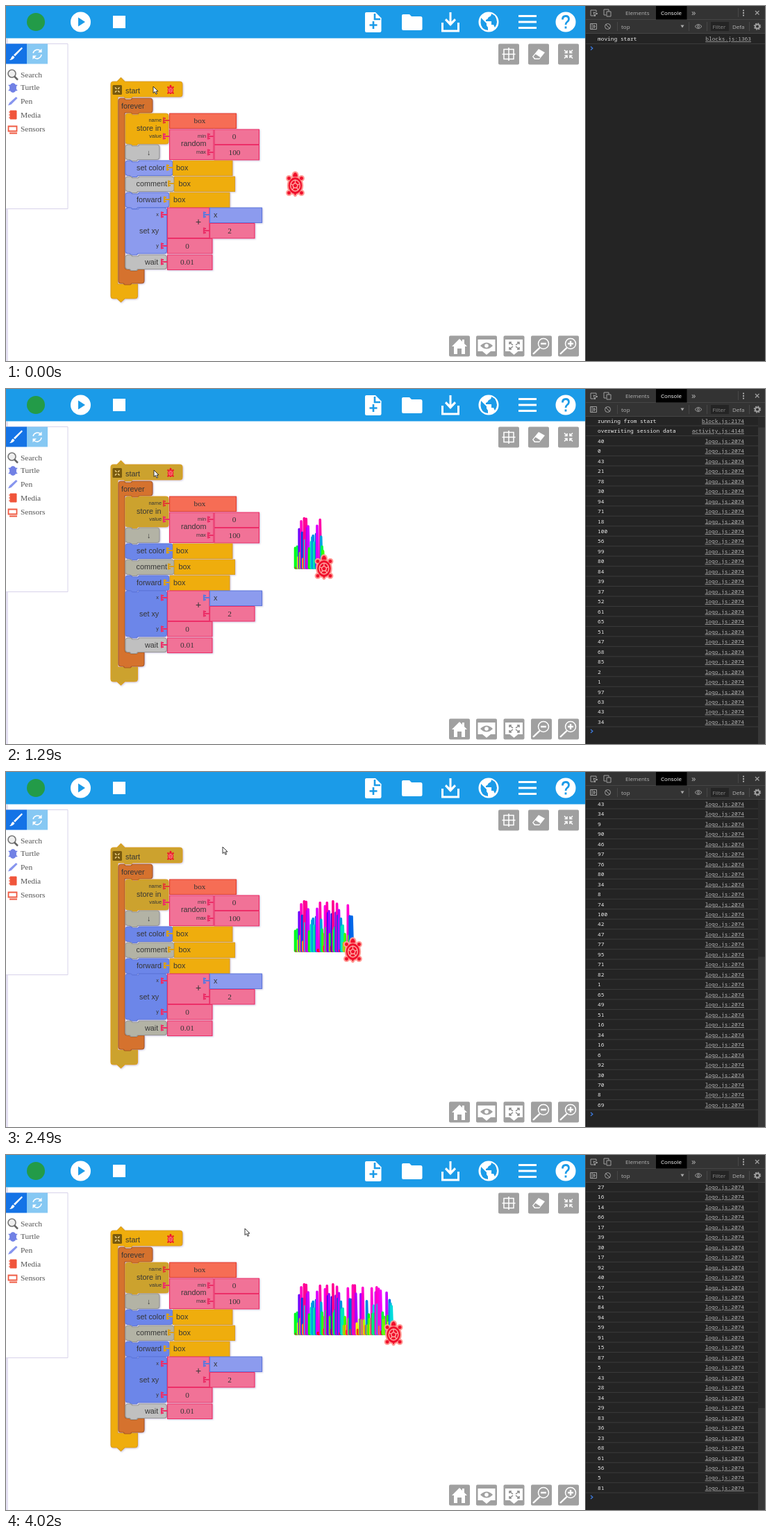
An HTML page that plays this animation: 1093 px wide and 512 px high, repeating every 4050 ms.

```html
<!DOCTYPE html>
<html lang="en">
<head>
<meta charset="utf-8">
<title>Block program</title>
<style>
html, body { margin: 0; width: 100%; height: 100%; overflow: hidden; background: #fff; }
svg { display: block; width: 100vw; height: 100vh; }
.sans { font: 10.8px "Liberation Sans", Arial, sans-serif; fill: #363636; }
.serif { font: 11.3px "Liberation Serif", Times, serif; fill: #333; }
.menu { font: 11.4px "Liberation Serif", Times, serif; fill: #555; }
.small { font-size: 7.4px; }
.mono { font: 7.84px "Noto Sans Mono", "DejaVu Sans Mono", monospace; fill: #eee; white-space: pre; }
.ui { font: 8px "Open Sans", "Noto Sans", sans-serif; fill: #b4b4b4; }
.link { fill: #b5b5b5; text-decoration: underline; text-anchor: end; }
.end { text-anchor: end; }
.mid { text-anchor: middle; }
.white { fill: #fff; }
.line { fill: none; stroke: #fff; stroke-width: 2; }
.thick { stroke-width: 3; }
.tool { fill: none; stroke: #a0a0a0; stroke-width: 1; }
.block { stroke-width: 1.2; stroke-linejoin: round; }
</style>
</head>
<body>
<svg viewBox="0 0 1093 512" preserveAspectRatio="none">
<defs>
  <filter id="shade" x="-10%" y="-10%" width="120%" height="120%">
    <feDropShadow dx="1" dy="1" stdDeviation="1.300" flood-color="#8a80b8" flood-opacity=".42"/>
  </filter>
  <clipPath id="log"><path d="M834 40H1093V512H834Z"/></clipPath>
  <g id="limbs">
    <path d="M-3-12Q-3-17 0-17.500 3-17 3-12ZM-1.500 12L0 15 1.500 12Z"/>
    <circle cx="-9" cy="-9.500" r="2.200"/><circle cx="9" cy="-9.500" r="2.200"/>
    <circle cx="-9" cy="11.500" r="2.200"/><circle cx="9" cy="11.500" r="2.200"/>
    <ellipse cy="1" rx="9.500" ry="11.500"/>
  </g>
  <g id="shell">
    <ellipse cy="1" rx="6.800" ry="8"/>
    <path d="M0-2.800L3.600 0 2.300 4.200H-2.300L-3.600 0ZM0-2.800V-7M3.600 0L6.500-1.500M2.300 4.200L4.200 7.300M-2.300 4.200L-4.200 7.300M-3.600 0L-6.500-1.500"/>
  </g>
  <g id="turtle">
    <use href="#limbs" fill="#ff9c96" stroke="#ff9c96" stroke-width="4.500" stroke-linejoin="round"/>
    <use href="#limbs" fill="#f0102c" stroke="#f0102c" stroke-width=".6"/>
    <use href="#shell" fill="none" stroke="#ffa8a2" stroke-width="1.400"/>
  </g>
</defs>

<rect width="834" height="512" fill="#fff"/>
<path d="M0 47H3V512H0Z" fill="#e4e0f2"/>
<rect width="834" height="46.500" fill="#1b9be8"/>

<circle cx="43" cy="23" r="13" fill="#239b48"/>
<circle cx="107.500" cy="23" r="14.500" class="white"/>
<path d="M104 16.500V29.500L114 23Z" fill="#1b9be8"/>
<path d="M154 14H172V32H154Z" class="white"/>
<path d="M519 9H532L540.500 17.500V36Q540.500 38 538 38H519Q517 38 517 36V11Q517 9 519 9Z" class="white"/>
<path d="M531 11V19H539M529 22V33M523.500 27.500H534.500" fill="none" stroke="#1b9be8" stroke-width="2.600"/>
<path d="M572 12H581L584 15H597Q599.500 15 599.500 17.500V32.500Q599.500 35 597 35H572Q570 35 570 32.500V14Q570 12 572 12Z" class="white"/>
<path d="M628.500 24V36H651.500V24" class="line thick"/>
<path d="M638.500 9H641.500V22.500L646 18 648 20.500 640 29 632 20.500 634 18 638.500 22.500Z" class="white"/>
<circle cx="695" cy="23" r="14.500" class="white"/>
<path d="M684 17L692 25V28L694 31V35Q684 34 683.500 24ZM699 11Q699 15 695 16 694 19 691 20V22H699V27H702L704 31Q710 23 704 14Z" fill="#1b9be8"/>
<path d="M738 14.500H764M738 23H764M738 31.500H764" class="line thick"/>
<circle cx="806" cy="23" r="14.500" class="white"/>
<path d="M801.500 19.500Q801.500 14.500 806 14.500T810.500 19Q810.500 21 808 23 806 24.500 806 27M806 29.500V32.500" fill="none" stroke="#1b9be8" stroke-width="2.800"/>

<path d="M0 54.500H89V292.500H0" fill="#fff" stroke="#d8d3ea"/>
<rect y="54.500" width="30" height="29" fill="#1473e6"/>
<rect x="30" y="54.500" width="30" height="29" fill="#86c8f3"/>
<path d="M11 70.500L22.500 59.500 24 61 13 72.500ZM10 71.500L12.500 74Q10 78 5 78 7.500 76 8 73.500Z" class="white"/>
<path d="M39 68A6.500 6.500 0 0 1 50 65M51 70A6.500 6.500 0 0 1 40 74" class="line" style="stroke-width:1.500"/>
<path d="M51.500 61.500V67H46ZM38.500 77V71.500H44Z" class="white"/>
<circle cx="8.500" cy="97.500" r="5.500" fill="#eee" stroke="#777" stroke-width="1.600"/>
<path d="M12 101.500L17 106.500" stroke="#666" stroke-width="2.500"/>
<path d="M10 111Q15 112 15 118T10 125Q5 124 5 118T10 111Z" fill="#7181e5"/>
<path d="M4 114L7 116M16 114L13 116M4 122L7 120M16 122L13 120" stroke="#7181e5" stroke-width="2"/>
<path d="M3 143.500L5 139.500 14.500 131 16.500 133 7.500 142Z" fill="#8795ee"/>
<path d="M6 151H15V163H6ZM4 153H6M4 157H6M4 161H6" fill="#f0553b" stroke="#f0553b"/>
<path d="M3.500 173.500H15.500V180.500H3.500ZM5 183.500H16" fill="none" stroke="#ef5a42" stroke-width="1.800"/>
<g class="menu">
  <text x="21" y="102.500">Search</text><text x="21" y="121">Turtle</text><text x="21" y="141">Pen</text>
  <text x="21" y="160.500">Media</text><text x="21" y="180.500">Sensors</text>
</g>

<g id="buttons" fill="#a0a0a0"></g>
<g class="line" style="stroke-width:1.500">
  <path d="M717 62.500H731V76.500H717ZM724 60V79M714.500 69.500H733.500"/>
  <path d="M804 63.500L808 67.500M808 64V67.500H804.500M816 63.500L812 67.500M812 64V67.500H815.500M804 75.500L808 71.500M808 75V71.500H804.500M816 75.500L812 71.500M812 75V71.500H815.500"/>
  <circle cx="774" cy="487" r="7.500"/><path d="M770 487H778M768.500 493L759 502" stroke-width="2.400"/>
  <circle cx="813" cy="487" r="7.500"/><path d="M809 487H817M813 483V491M807.500 493L798 502" stroke-width="2.400"/>
</g>
<path d="M758 73L767 62 776 67 768 77H761Z" class="white"/>
<path d="M759.500 73L762.500 69.500 769.500 74 768 75.500H762Z" fill="#a0a0a0"/>
<path d="M642 491L653 480 657 484V481H660V487L664 491H661V502H656V494H650V502H645V491Z" class="white"/>
<path d="M679.500 481H704.500V498H698L692 503 686 498H679.500ZM719 481H744V498H737.500L731.500 503 725.500 498H719Z" class="white"/>
<path d="M683 490Q692 481 701 490 692 499 683 490Z" fill="#a0a0a0"/>
<circle cx="692" cy="490" r="2.800" class="white"/>
<path d="M725 488V485H728M736 485H739V488M739 492V495H736M728 495H725V492M726 486L730 489M738 486L734 489M726 494L730 491M738 494L734 491" fill="none" stroke="#888" stroke-width="1.500"/>

<g id="blocks" filter="url(#shade)"></g>
<g id="labels"></g>
<rect x="153.500" y="114" width="13.500" height="14" rx="1.500" fill="#795a0e"/>
<path d="M157 117.500L159.300 119.800M163.500 117.500L161.200 119.800M157 124.500L159.300 122.200M163.500 124.500L161.200 122.200" stroke="#f3d78a" stroke-width="1.500"/>
<g transform="translate(237 121) scale(.4)">
  <use href="#limbs" fill="#f0102c" stroke="#f0102c" stroke-width="2"/>
  <use href="#shell" fill="none" stroke="#ffb0a0" stroke-width="1.600"/>
</g>
<circle id="ripple" cx="212" cy="118" fill="none" stroke="#c08a1c" stroke-width="1.500"/>

<g id="pen" fill="none" stroke-width="3.600" stroke-linecap="round" stroke-linejoin="round"></g>
<use id="runner" href="#turtle"/>
<path id="cursor" d="M0 0V9.500L2.300 7.500 4 11.200 5.600 10.500 4 7H7Z" fill="#fff" stroke="#222" stroke-width=".9"/>

<rect x="834" width="259" height="512" fill="#242424"/>
<g clip-path="url(#log)">
  <g id="rows">
    <g id="texts" class="mono"></g>
    <g id="links" class="mono"></g>
    <path id="prompt" d="M842 -2.500L844.800 0 842 2.500" fill="none" stroke="#3d7be0" stroke-width="1.300"/>
  </g>
  <g id="bar"><path d="M1083 40H1093V512H1083Z" fill="#2a2a2a"/><rect id="thumb" x="1083" width="10" fill="#383838"/></g>
</g>
<rect x="834" width="259" height="39.500" fill="#333"/>
<path d="M834 19.500H1093M834 39.500H1093" stroke="#454545"/>
<path d="M834.500 0V512" stroke="#4a4a4a"/>
<rect x="936" width="44.500" height="19.500" fill="#000"/>
<g class="ui">
  <text x="892" y="13">Elements</text><text x="943" y="13" class="white">Console</text>
  <text x="987" y="13.500" style="font-size:13px">»</text>
  <text x="886" y="32.500">top</text>
  <rect x="1015" y="23" width="26" height="13" fill="#242424"/>
  <text x="1017.500" y="32.500" style="fill:#8a8a8a">Filter</text><text x="1046" y="32.500">Defa</text>
</g>
<g class="tool">
  <path d="M849 14H842V6H850V9M846 9L852 11 849 12 848 15ZM861 13V5H868V8M861 13H864M865 8H871V15H865Z"/>
  <path d="M841.500 25.500H850.500V33.500H841.500ZM844 25.500V33.500M846.500 27.500L849 29.500 846.500 31.500Z"/>
  <circle cx="866.500" cy="29.500" r="4"/><path d="M863.700 26.700L869.300 32.300"/>
  <path d="M992 29.500Q997 23.500 1002 29.500 997 35.500 992 29.500Z"/><circle cx="997" cy="29.500" r="1.500"/>
  <path d="M1079 7L1084.500 12.500M1084.500 7L1079 12.500" stroke-width="1.200"/>
  <circle cx="1082" cy="29.500" r="3" stroke-width="2"/><circle cx="1082" cy="29.500" r="4.500" stroke-width="1.500" stroke-dasharray="1.800 1.740"/>
</g>
<path d="M1061 5.500h2v2h-2zM1061 9h2v2h-2zM1061 12.500h2v2h-2zM971.500 27.500H976.500L974 31.500Z" fill="#a8a8a8"/>
<path d="M880.500 23V36M983.500 23V36M1009.500 23V36M1070.500 23V36M1054.500 3V16" stroke="#474747"/>
</svg>

<script>
const LOOP = 4050, FRAME = 30, STEP_X = 1.43, UNIT = STEP_X / 2, HOME = { x: 416.5, y: 258 };
const ROW = 14.47, FIRST_ROW = 47.5, LAST_ROW = 494.6, LOG_TOP = 40, LOG_H = 472;

const values = [
  40, 0, 43, 21, 78, 30, 94, 71, 18, 100, 56, 99, 80, 84, 39, 37, 52, 61, 65, 51,
  47, 68, 85, 2, 1, 97, 63, 43, 34, 9, 90, 46, 97, 76, 80, 34, 8, 74, 100, 42,
  47, 77, 95, 71, 82, 1, 65, 49, 51, 16, 34, 16, 6, 92, 30, 70, 8, 69, 98, 93,
  98, 81, 21, 8, 7, 29, 80, 28, 93, 27, 16, 14, 66, 17, 39, 30, 17, 92, 40, 57,
  41, 84, 94, 59, 91, 15, 87, 5, 43, 28, 34, 29, 83, 36, 23, 68, 61, 56, 5, 81];

const progress = [[170, 0], [690, 13.3], [1290, 29.6], [1860, 42.6], [2490, 58.8], [3570, 88.2], [4020, 100.3]];
const pointerX = [[0, 212], [300, 212.5], [690, 213], [2200, 213], [2490, 312], [2640, 344]];
const pointerY = [[0, 116], [690, 117], [2200, 117], [2490, 108], [2640, 106]];
const waitFlashes = [840, 1410, 1950, 2490, 3060, 3600];
const hues = [-10, 22, 52, 92, 125, 168, 188, 216, 278, 306, 326].map((hue, i) => [i * 10, hue]);
const lightness = [[40, 50], [55, 43], [68, 45], [78, 50]];

const $ = id => document.getElementById(id);

function add(parent, tag, attrs, text) {
  const node = document.createElementNS('http://www.w3.org/2000/svg', tag);
  for (const key in attrs) node.setAttribute(key, attrs[key]);
  if (text !== undefined) node.textContent = text;
  return parent.appendChild(node);
}

function lerp(table, at) {
  if (at <= table[0][0]) return table[0][1];
  for (let i = 1; i < table.length; i++) {
    const [a, from] = table[i - 1], [b, to] = table[i];
    if (at <= b) return from + (to - from) * (at - a) / (b - a);
  }
  return table[table.length - 1][1];
}

// fill, stroke, fill while running
const paint = {
  gold: ['#efad0a', '#dba01a', '#cca22f'],
  brown: ['#d5722f', '#a95a22'],
  grey: ['#c0c0c0', '#979797', '#b3b3a5'],
  blue: ['#8c9bee', '#5f78dc', '#6c86e9'],
  pink: ['#f17297', '#ec2f68'],
  red: ['#f66d55', '#e23f33']
};

const shape = (kind, d) => add($('blocks'), 'path', { class: 'block', d, fill: paint[kind][0], stroke: paint[kind][1] });
const setRunning = (node, kind, on) => node.setAttribute('fill', paint[kind][on ? 2 : 0]);
const label = (text, x, y, cls = 'sans') => add($('labels'), 'text', { x, y, class: cls }, text);

function stack(kind, y, w, h) {
  return shape(kind, `M176 ${y}h4l2 2h8l2-2H${168 + w}q4 0 4 4V${y + h - 4}q0 4-4 4H190l-2 2h-8l-2-2h-2q-4 0-4-4V${y + 4}q0-4 4-4Z`);
}

function arg(kind, x, y, w, h = 21.5) {
  shape(kind, `M${x} ${y}h${w}v${h}h${-w}Z`);
}

function plug(kind, x, y) {
  add($('labels'), 'path', { d: `M${x - 8} ${y - 4.5}v9M${x - 8} ${y - 3}h3M${x - 8} ${y + 3}h3M${x - 8} ${y}h8`, fill: 'none', stroke: paint[kind][1], 'stroke-width': 2.2 });
}

const start = shape('gold', 'M155 109H160L165.500 103.500 171 109H250Q254 109 254 113V127Q254 131 250 131H182l-2 2h-8l-2-2H161V401H189.500V418Q189.500 422 185 422H171L165.500 427 160 422H155Q151 422 151 418V113Q151 109 155 109Z');
shape('brown', 'M166 133H170l2 2h8l2-2H207Q211 133 211 137V150Q211 154 207 154H192l-2 2h-8l-2-2H171V376Q171 380 175 380H178l2 2h8l2-2H199V396Q199 400 195 400H181l-2 2h-8l-2-2H166Q162 400 162 396V137Q162 133 166 133Z');

const storeIn = stack('gold', 155, 62, 44);
const penDown = stack('grey', 200, 49, 21.5);
const setColor = stack('blue', 223, 68, 21.5);
const comment = stack('grey', 246, 70, 21.5);
const forward = stack('blue', 269, 63, 21.5);
const setXY = stack('blue', 291, 59.5, 66);
const wait = stack('grey', 359, 59.5, 20.5);
const body = [[storeIn, 'gold'], [penDown, 'grey'], [setColor, 'blue'], [comment, 'grey'], [forward, 'blue'], [setXY, 'blue']];

arg('red', 235.5, 155, 96);
arg('pink', 235.5, 178, 63.5, 43.5);
arg('pink', 300, 178, 64.5);
arg('pink', 300, 200.5, 64.5);
arg('gold', 240.5, 223, 85.5);
arg('gold', 242.5, 246, 87);
arg('gold', 236, 269, 86);
arg('pink', 232.5, 291, 60.5, 43.5);
arg('blue', 293.5, 291, 75);
arg('pink', 293.5, 313.5, 64.5);
arg('pink', 232.5, 335.5, 64.5);
arg('pink', 232.5, 359, 64.5);

[['red', 235, 165], ['pink', 235, 188], ['pink', 299, 188], ['pink', 299, 211], ['gold', 240, 233], ['gold', 242, 256],
 ['gold', 236, 279], ['pink', 232, 301], ['blue', 293, 301], ['pink', 293, 324], ['pink', 232, 346], ['pink', 232, 369]]
  .forEach(p => plug(...p));

[['start', 172, 126], ['forever', 166, 148], ['store in', 188, 180], ['random', 252, 202], ['↓', 203, 215], ['set color', 188, 237],
 ['comment', 187.5, 260], ['forward', 188, 283], ['set xy', 192, 328], ['wait', 200, 373], ['box', 245, 237], ['box', 248.5, 260],
 ['box', 241, 283], ['x', 299, 305]].forEach(p => label(...p));
label('+', 277, 315.5, 'sans mid').style.fontSize = '14px';
[['name', 224, 167], ['value', 224, 190], ['min', 288, 190], ['max', 288, 213], ['x', 220, 303], ['y', 220, 348]]
  .forEach(p => label(...p, 'sans small end'));
[['box', 279, 169], ['0', 328.5, 192], ['100', 329, 214.5], ['2', 322, 328], ['0', 261, 350], ['0.01', 261, 373]]
  .forEach(p => label(...p, 'serif mid'));

[[709, 54.5], [752, 54.5], [795, 54.5], [638, 475.5], [677, 475.5], [716.5, 475.5], [756, 475.5], [795, 475.5]]
  .forEach(([x, y]) => add($('buttons'), 'rect', { x, y, width: 30, height: 30, rx: 2 }));

const messages = [['moving start', 'blocks.js:1363'], ['running from start', 'block.js:2174'],
  ['overwriting session data', 'activity.js:4148'], ...values.map(v => [v, 'logo.js:2074'])];
const rows = messages.map(([text, file], i) => {
  const y = FIRST_ROW + i * ROW;
  return [
    add($('texts'), 'text', { x: 852, y: y + 2.8 }, text),
    add($('texts'), 'path', { d: `M835 ${y + 7}H1093`, stroke: '#3b3b3b' }),
    add($('links'), 'text', { x: 1073, y: y + 2.8, class: 'link' }, file)
  ];
});

const strokes = values.map((v, i) => {
  const x = HOME.x + i * STEP_X;
  return add($('pen'), 'path', {
    d: `M${x} ${HOME.y}v${-v * UNIT}L${x + STEP_X} ${HOME.y}`,
    stroke: `hsl(${(lerp(hues, v) + 360) % 360} 100% ${lerp(lightness, v)}%)`
  });
});

const show = (node, on) => node.style.display = on ? '' : 'none';
const move = (node, x, y) => node.setAttribute('transform', `translate(${x} ${y})`);

function drawConsole(t, count) {
  const shown = t < 90 ? 1 : t < 150 ? 2 : 3 + count;
  const end = FIRST_ROW + shown * ROW;
  const scroll = Math.max(0, end - LAST_ROW);
  rows.forEach((parts, i) => parts.forEach(part => show(part, i < shown)));
  move($('prompt'), 0, end - 1);
  move($('rows'), 0, -scroll);
  move($('links'), scroll ? -10 : 0, 0);
  show($('bar'), scroll > 0);
  const height = LOG_H * LOG_H / (LOG_H + scroll);
  $('thumb').setAttribute('y', LOG_TOP + LOG_H - height);
  $('thumb').setAttribute('height', height);
}

function draw(t) {
  const done = lerp(progress, t);
  const moves = Math.max(0, Math.floor(done - 0.5));
  drawConsole(t, Math.floor(done));
  strokes.forEach((stroke, i) => show(stroke, i < moves));
  move($('runner'), HOME.x + moves * STEP_X, HOME.y);
  move($('cursor'), lerp(pointerX, t), lerp(pointerY, t));

  setRunning(start, 'gold', t >= 90 && t < 2610);
  body.forEach(([node, kind], i) => setRunning(node, kind, t >= 150 + i * 5));
  setRunning(wait, 'grey', waitFlashes.includes(t));

  show($('ripple'), t >= 90 && t < 780);
  $('ripple').setAttribute('r', lerp([[90, 3], [690, 10], [780, 11]], t));
  $('ripple').setAttribute('opacity', lerp([[90, .9], [690, .55], [780, 0]], t));
}

const origin = performance.now();
function tick() {
  const t = (performance.now() - origin) % LOOP;
  draw(Math.floor(t / FRAME) * FRAME);
  requestAnimationFrame(tick);
}
tick();
</script>
</body>
</html>
```
